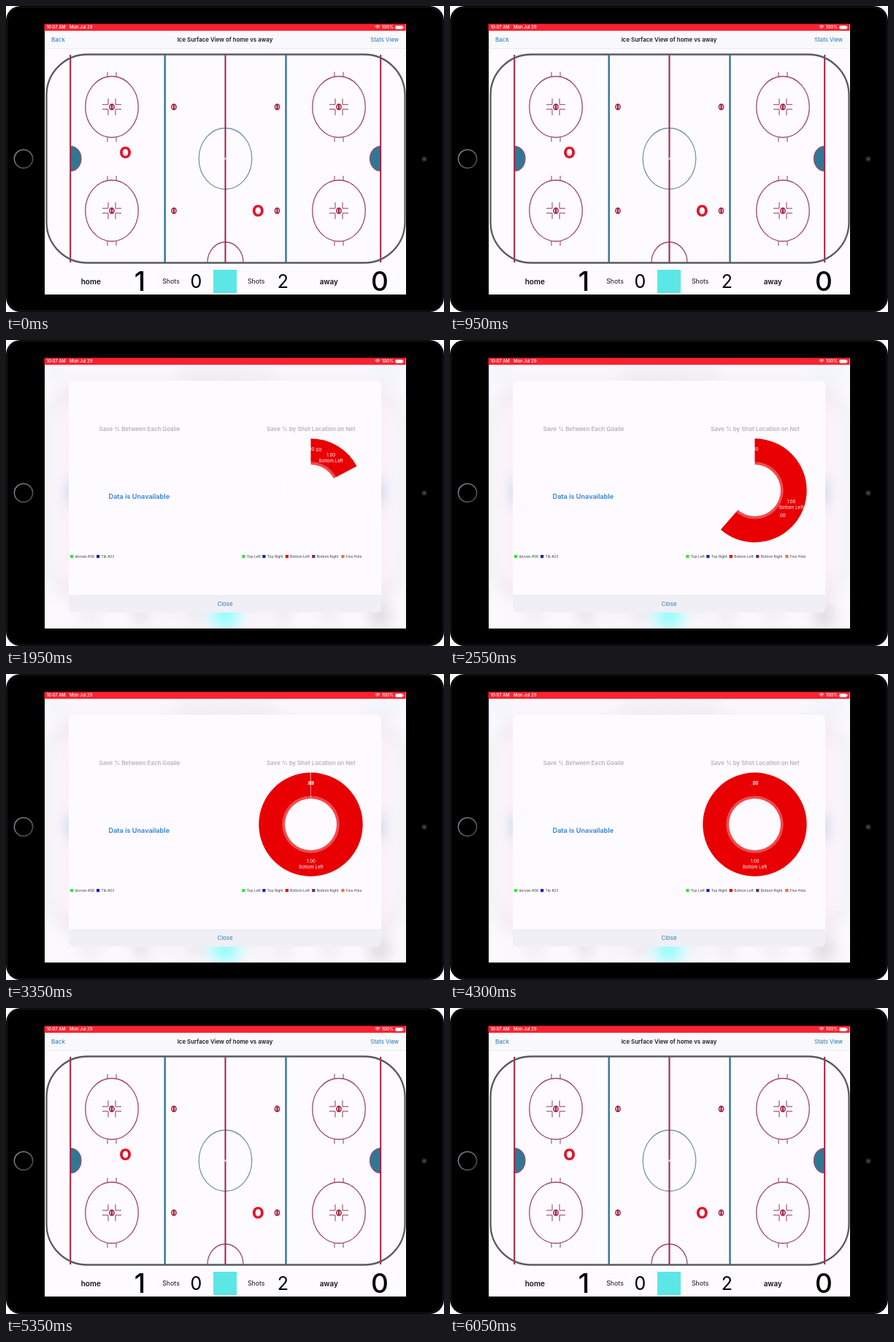
An HTML page with a canvas for the animation above (6.15 s loop, 600x420 px).

```html
<!DOCTYPE html>
<html lang="en">
<head>
<meta charset="utf-8">
<title>Ice surface and save chart</title>
<style>
html, body { margin: 0; width: 100%; height: 100%; overflow: hidden; background: #fff; }
canvas { display: block; width: 600px; height: 420px; }
</style>
</head>
<body>
<canvas id="stage" width="600" height="420"></canvas>
<script>
const W = 600, H = 420, LOOP = 6150;
const TAU = Math.PI * 2;
const FONT = 'Inter, "Liberation Sans", sans-serif';
const SCREEN = [52.5, 24.5, 495, 371];
const RED = '#a81f40', PINK = '#a14766', BLUE = '#2e7896', PAPER = '#fdfbff';

const stage = document.getElementById('stage').getContext('2d');
const rink = makeLayer(), blurred = makeLayer(), popup = makeLayer(), device = makeLayer();

function makeLayer() {
  const c = document.createElement('canvas');
  c.width = W;
  c.height = H;
  return c.getContext('2d');
}

function text(g, str, x, y, size, color, weight = 400, align = 'center') {
  g.font = `${weight} ${size}px ${FONT}`;
  g.textAlign = align;
  g.textBaseline = 'alphabetic';
  g.fillStyle = color;
  g.fillText(str, x, y + size * 0.36);
}

function line(g, x1, y1, x2, y2, color, width) {
  g.strokeStyle = color;
  g.lineWidth = width;
  g.beginPath();
  g.moveTo(x1, y1);
  g.lineTo(x2, y2);
  g.stroke();
}

function oval(g, x, y, rx, ry, color, width, from = 0, to = TAU) {
  g.strokeStyle = color;
  g.lineWidth = width;
  g.beginPath();
  g.ellipse(x, y, rx, ry, 0, from, to);
  g.stroke();
}

function disc(g, x, y, r, color) {
  g.fillStyle = color;
  g.beginPath();
  g.arc(x, y, r, 0, TAU);
  g.fill();
}

function box(g, x, y, w, h, r, color) {
  g.fillStyle = color;
  g.beginPath();
  g.roundRect(x, y, w, h, r);
  g.fill();
}

function spot(g, x, y) {
  oval(g, x, y, 3.1, 3.8, RED, 1.5);
  line(g, x, y - 3.5, x, y + 3.5, RED, 2.3);
}

function faceoff(g, x, y) {
  oval(g, x, y, 36.3, 42, PINK, 1.3);
  for (const sx of [-1, 1]) {
    for (const sy of [-1, 1]) {
      const px = x + sx * 5, py = y + sy * 3.2;
      line(g, px, py, px, y + sy * 11.5, PINK, 1.1);
      line(g, px, py, x + sx * 13, py, PINK, 1.1);
      line(g, x + sx * 6, y + sy * 41.5, x + sx * 6, y + sy * 48, PINK, 1.1);
    }
  }
  spot(g, x, y);
}

function crease(g, x, side) {
  const a = side * Math.PI / 2;
  g.fillStyle = BLUE;
  g.strokeStyle = PINK;
  g.lineWidth = 1.2;
  g.beginPath();
  g.ellipse(x, 209.5, 14.5, 17, 0, -a, a);
  g.fill();
  g.stroke();
}

function drawRink(g) {
  g.fillStyle = PAPER;
  g.fillRect(0, 0, W, H);
  g.fillStyle = '#f9f8fb';
  g.fillRect(52, 34, 496, 24);
  line(g, 52, 58.5, 548, 58.5, '#ecebef', 1);
  text(g, 'Back', 62, 46, 8.1, '#2077b0', 400, 'left');
  text(g, 'Ice Surface View of home vs away', 300, 46, 7.9, '#1c1c20', 600);
  text(g, 'Stats View', 538, 46, 7.8, '#2077b0', 400, 'right');

  oval(g, 300.5, 209.5, 36.3, 42, '#7595ab', 1.3);
  oval(g, 300.5, 352, 24.5, 28, PINK, 1.3, Math.PI, TAU);
  for (const y of [138.5, 281]) {
    faceoff(g, 145, y);
    faceoff(g, 456, y);
    spot(g, 230, y);
    spot(g, 371.5, y);
  }
  crease(g, 88.5, 1);
  crease(g, 513, -1);
  for (const x of [88.2, 300.5, 513.2]) line(g, x, 67, x, 352, RED, 2);
  for (const x of [217.7, 383.5]) line(g, x, 67, x, 352, BLUE, 2.4);
  disc(g, 300.5, 209.5, 1.5, '#c9d9ee');

  g.strokeStyle = '#5b5b5f';
  g.lineWidth = 2.3;
  g.beginPath();
  g.roundRect(55.5, 66.5, 491, 286, 56);
  g.stroke();

  text(g, 'O', 163.5, 201, 21.5, '#e2142a', 800);
  text(g, 'O', 345.3, 281, 21.5, '#e2142a', 800);

  const ink = '#111114';
  text(g, 'home', 116.3, 378, 10, ink, 600);
  text(g, '1', 183.5, 377.5, 37, '#000', 500);
  text(g, 'Shots', 226, 378, 8.8, ink);
  text(g, '0', 260.3, 378, 25, '#000');
  text(g, 'Shots', 342.7, 378, 8.8, ink);
  text(g, '2', 379.3, 378, 25, '#000');
  text(g, 'away', 442.3, 378, 9.9, ink, 600);
  text(g, '0', 512, 377.5, 37, '#000', 500);
  box(g, 284, 362, 32, 32, 0, '#5ce6e6');
}

function drawBlur(g) {
  g.fillStyle = PAPER;
  g.fillRect(0, 0, W, H);
  g.filter = 'blur(11px) saturate(2.2)';
  g.drawImage(rink.canvas, 0, 0);
  g.filter = 'none';
  g.fillStyle = 'rgba(250,248,252,0.58)';
  g.fillRect(0, 0, W, H);
}

function legend(g, items) {
  for (const [x, color, label] of items) {
    box(g, x, 295, 4.2, 4.2, 0, color);
    text(g, label, x + 6.5, 297.2, 4.9, '#3a3a3e', 400, 'left');
  }
}

function chartLabel(g, degrees, value, name) {
  const a = degrees * Math.PI / 180;
  const x = 417.7 + 53.2 * Math.sin(a), y = 207.3 - 53.2 * Math.cos(a);
  text(g, value, x, y - 4, 6.1, '#fff');
  if (name) text(g, name, x, y + 4, 6.1, '#fff');
}

function drawChart(g, phase) {
  const cx = 417.5, cy = 206.5, top = -Math.PI / 2;
  g.fillStyle = '#e80003';
  g.beginPath();
  g.moveTo(cx, cy);
  g.arc(cx, cy, 71.2, top, top + TAU * phase);
  g.closePath();
  g.fill();
  disc(g, cx, cy, 39.3, 'rgba(253,251,255,0.3)');
  disc(g, cx, cy, 35.5, PAPER);

  // Label angles follow both animated axes, so the last ones lag the edge.
  const end = 360 * phase * phase;
  chartLabel(g, 0, '.00');
  chartLabel(g, 180 * phase, '1.00', 'Bottom Left');
  chartLabel(g, end, '.00');
}

function drawPopup(g, phase) {
  g.drawImage(blurred.canvas, 0, 0);
  box(g, 86, 56, 428, 318, 6, PAPER);
  box(g, 86, 350, 428, 24, [0, 0, 6, 6], '#f0eff5');
  text(g, 'Save % Between Each Goalie', 183, 122, 7.9, '#b4b2b8', 600);
  text(g, 'Save % by Shot Location on Net', 418, 122, 7.9, '#b4b2b8', 600);
  text(g, 'Data is Unavailable', 182.3, 215, 9.1, '#2f80d6', 600);
  text(g, 'Close', 300, 362, 7.8, '#317fb2');
  legend(g, [
    [88, '#38e33a', 'dorvan #56'],
    [124, '#1c22b0', 'Tib #23'],
    [323.3, '#38e33a', 'Top Left'],
    [351.3, '#1c22b0', 'Top Right'],
    [382.7, '#e80003', 'Bottom Left'],
    [419.2, '#6d2a66', 'Bottom Right'],
    [459.3, '#f2703f', 'Five Hole']
  ]);
  drawChart(g, phase);
}

function drawDevice(g) {
  box(g, 0, 0, 600, 420, 20, '#000');
  g.strokeStyle = '#1d1d1f';
  g.lineWidth = 1;
  g.beginPath();
  g.roundRect(1.5, 1.5, 597, 417, 19);
  g.stroke();
  const shine = g.createLinearGradient(14, 200, 34, 220);
  shine.addColorStop(0, '#85858a');
  shine.addColorStop(1, '#48484c');
  oval(g, 24, 209.8, 12.6, 12.6, shine, 1.6);
  disc(g, 573, 210, 3.6, '#28282b');
  disc(g, 573, 210, 1.6, '#4a4a50');
  g.clearRect(...SCREEN);

  g.fillStyle = '#fb2230';
  g.fillRect(52.5, 24.5, 495, 9.5);
  text(g, '10:07 AM', 55.5, 29.2, 5.9, '#fff', 500, 'left');
  text(g, 'Mon Jul 29', 87, 29.2, 5.9, '#fff', 500, 'left');
  text(g, '100%', 531, 29.2, 5.9, '#fff', 500, 'right');
  for (const r of [1.6, 3.2, 4.8]) oval(g, 509, 31.5, r, r, '#fff', 0.9, -Math.PI * 0.75, -Math.PI * 0.25);
  box(g, 533.5, 27, 10, 4.8, 1.2, '#fff');
  box(g, 544.2, 28.5, 0.9, 1.8, 0.4, '#fff');
}

// Sine ease in and out between two times.
function ease(t, from, to) {
  const x = Math.min(1, Math.max(0, (t - from) / (to - from)));
  return (1 - Math.cos(Math.PI * x)) / 2;
}

function render(t) {
  const fade = ease(t, 1365, 1715) * (1 - ease(t, 4890, 5240));
  stage.fillStyle = '#fff';
  stage.fillRect(0, 0, W, H);
  stage.drawImage(rink.canvas, 0, 0);
  if (fade > 0) {
    drawPopup(popup, ease(t, 1405, 3405));
    stage.globalAlpha = fade;
    stage.drawImage(popup.canvas, 0, 0);
    stage.globalAlpha = 1;
  }
  // Keep the page white outside the rounded device body.
  stage.globalCompositeOperation = 'destination-in';
  stage.beginPath();
  stage.roundRect(0, 0, W, H, 20);
  stage.fill();
  stage.globalCompositeOperation = 'source-over';
  stage.drawImage(device.canvas, 0, 0);
}

drawRink(rink);
drawBlur(blurred);
drawDevice(device);

const start = performance.now();
function tick() {
  render((performance.now() - start) % LOOP);
  requestAnimationFrame(tick);
}
tick();
</script>
</body>
</html>
```
